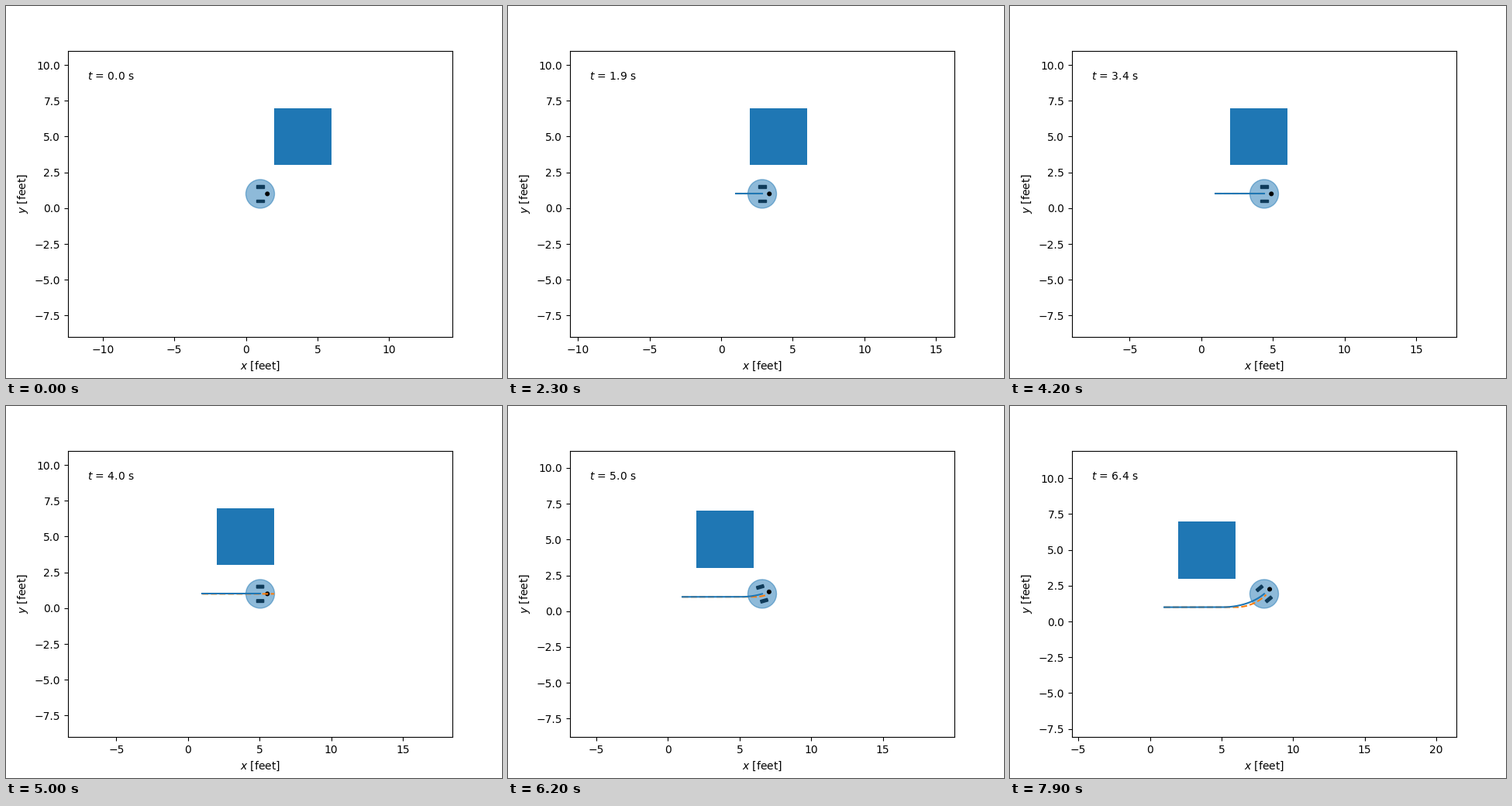
A matplotlib script for the animation above (8000 ms loop, 640 px wide and 480 px high).

```python
import numpy as np
import matplotlib.pyplot as plt
from matplotlib.animation import FuncAnimation
from matplotlib.patches import Circle, Rectangle
from matplotlib.transforms import Affine2D

FRAMES, INTERVAL = 80, 100
DT = 0.005
TURN = 4.03          # time at which the plan leaves the straight line
RADIUS = 3.0
VIEW = 10.0          # half height of the view, in feet
K_X, K_Y, K_TH = 1.0, 0.6, 1.0


def plan(t):
    """Planned pose and turn rate: a straight line, then an arc."""
    if t < TURN:
        return 1 + t, 1.0, 0.0, 0.0
    a = (t - TURN) / RADIUS
    return 6 + RADIUS * np.sin(a), 1 + RADIUS * (1 - np.cos(a)), a, 1 / RADIUS


def simulate(t_end):
    """Differential drive robot following the plan at unit speed."""
    x, y, th = 1.0, 1.0, 0.0
    poses, planned = [], []
    for t in np.arange(0, t_end, DT):
        xp, yp, thp, wp = plan(t)
        poses.append((x, y, th))
        planned.append((xp, yp))
        c, s = np.cos(th), np.sin(th)
        ex = c * (xp - x) + s * (yp - y)
        ey = -s * (xp - x) + c * (yp - y)
        eth = thp - th
        v = np.cos(eth) + K_X * ex
        w = wp + K_Y * ey + K_TH * np.sin(eth)
        x += v * c * DT
        y += v * s * DT
        th += w * DT
    return np.array(poses), np.array(planned)


def clock(n):
    return 0.02 + 0.0803 * n if n else 0.0


poses, planned = simulate(clock(FRAMES) + 0.1)

fig, ax = plt.subplots(figsize=(6.4, 4.8), dpi=100)
ax.set_xlabel('$x$ [feet]')
ax.set_ylabel('$y$ [feet]')
box = ax.get_position()
half_w = VIEW * (box.width * 640) / (box.height * 480)

ax.add_patch(Rectangle((2, 3), 4, 4))
parts = [
    Rectangle((-0.25, 0.4), 0.5, 0.2, color='black'),
    Rectangle((-0.25, -0.6), 0.5, 0.2, color='black'),
    Circle((0, 0), 1, color='C0', alpha=0.5),
    Circle((0.5, 0), 0.125, color='black'),
]
for part in parts:
    ax.add_patch(part)

plan_line, = ax.plot([], [], '--', color='C1', zorder=2)
trail, = ax.plot([], [], color='C0', zorder=2.1)
label = ax.text(0.05, 0.9, '', transform=ax.transAxes)


def update(n):
    t = clock(n)
    i = int(round(t / DT))
    x, y, th = poses[i]
    ax.set_xlim(x - half_w, x + half_w)
    ax.set_ylim(y - VIEW, y + VIEW)
    pose = Affine2D().rotate(th).translate(x, y) + ax.transData
    for part in parts:
        part.set_transform(pose)
    plan_line.set_data(*planned[:i + 4].T)
    trail.set_data(poses[:i + 1, 0], poses[:i + 1, 1])
    label.set_text(f'$t$ = {t:.1f} s')
    return [*parts, plan_line, trail, label]


anim = FuncAnimation(fig, update, frames=FRAMES, interval=INTERVAL,
                     init_func=lambda: update(0), repeat=True,
                     repeat_delay=0, blit=False)
plt.show()
```
